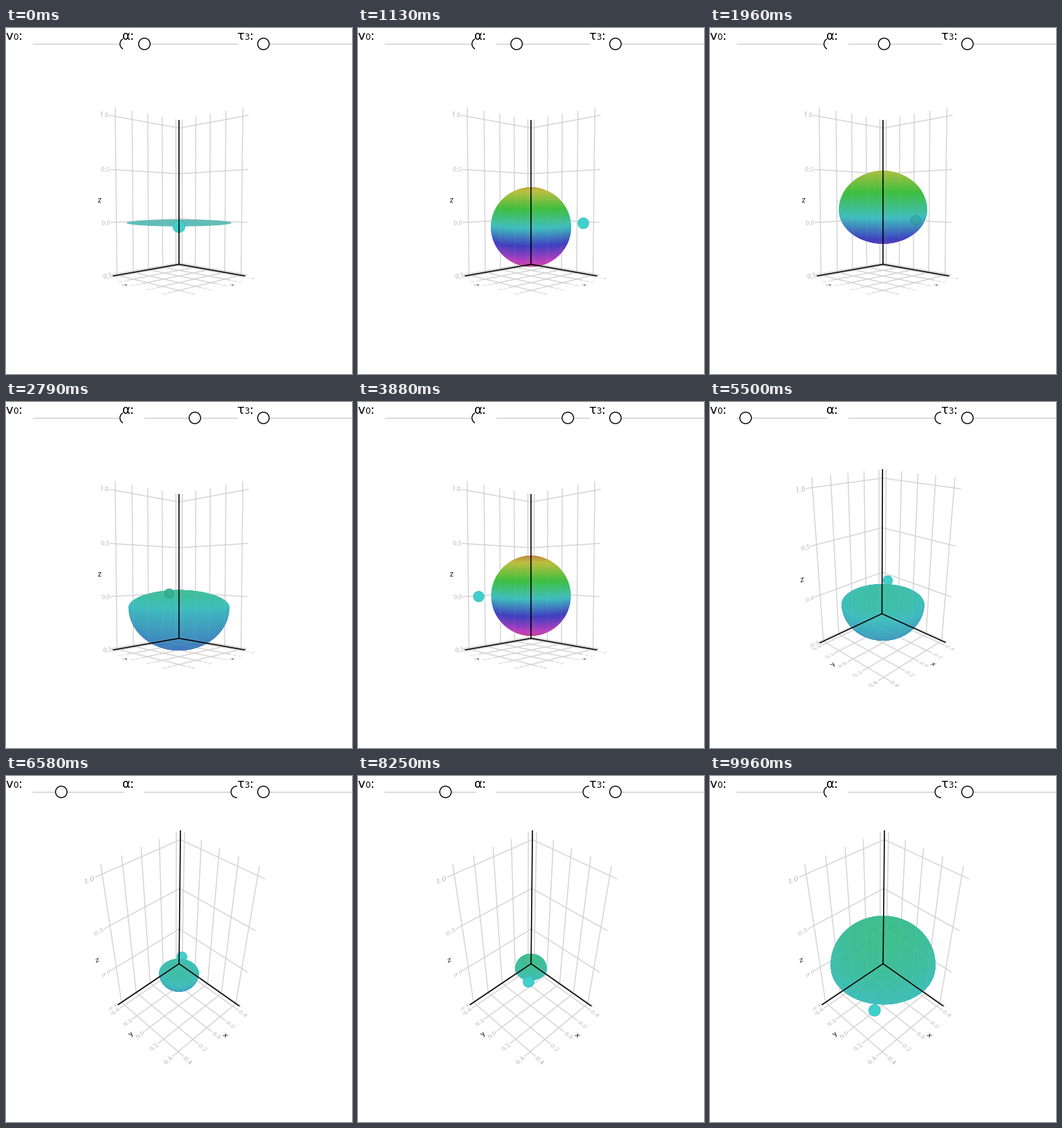
These frames come from a looping animation (500x500 px, 10 s). A matplotlib script:

```python
import numpy as np
import matplotlib.pyplot as plt
from matplotlib.animation import FuncAnimation
from matplotlib.collections import LineCollection, PolyCollection
from matplotlib.colors import hsv_to_rgb
from matplotlib.patches import Circle, PathPatch, Rectangle
from matplotlib.path import Path
from matplotlib.textpath import TextPath

SIZE, DPI = 500, 100
FRAMES, INTERVAL = 250, 40
PX = 72 / DPI
FPS, HALF = 24, 119          # stepping rate and steps per slider sweep

DIST, FOCAL, MID = 3.6, 547, (250, 281)
EDGE, FLOOR, TOP = 0.45, -0.515, 1.085
TICKS = (-0.4, -0.2, 0.0, 0.2, 0.4)
ORBIT, BALL = 0.495, 0.05
ALPHA_MAX = np.radians(352)
GRID = (0.83, 0.83, 0.83)
STROKE = 1.6                 # ring outline in pixels, closes gaps between rings

# camera path: time in ms, elevation, azimuth offset and roll in degrees
CAM_T = (3980, 4180, 4900, 5500, 6200)
CAM_EL = (3.75, 11, 25.5, 24.8, 44.5)
CAM_AZ = (0, 0.3, 1, 1, 0)
CAM_ROLL = (0, 0.1, 0.2, 0.3, 0.6)


class Camera:
    def __init__(self, ms):
        self.el, self.az, self.roll = (
            np.radians(np.interp(ms, CAM_T, key)) for key in (CAM_EL, CAM_AZ, CAM_ROLL))
        self.eye_z = DIST * np.sin(self.el)

    def project(self, pts):
        """World points (..., 3) to screen pixels and pixels per unit."""
        x, y, z = np.moveaxis(np.asarray(pts, float), -1, 0)
        lat, near = (x - y) / np.sqrt(2), (x + y) / np.sqrt(2)
        ca, sa = np.cos(self.az), np.sin(self.az)
        lat, near = lat * ca + near * sa, near * ca - lat * sa
        c, s = np.cos(self.el), np.sin(self.el)
        up = z * c - near * s
        scale = FOCAL / (DIST - near * c - z * s)
        sx = MID[0] + (lat + self.roll * up) * scale
        sy = MID[1] - (up - self.roll * lat) * scale
        return np.stack([sx, sy], -1), scale


def grid_lines():
    lines = []
    for t in TICKS:
        lines += [
            [(-EDGE, t, FLOOR), (-EDGE, t, TOP)],
            [(t, -EDGE, FLOOR), (t, -EDGE, TOP)],
            [(t, -EDGE, FLOOR), (t, 0.47, FLOOR)],
            [(-EDGE, t, FLOOR), (0.47, t, FLOOR)],
        ]
    for z in (-0.5, 0.0, 0.5, 1.0):
        lines += [
            [(-EDGE, -EDGE, z), (-EDGE, 0.468, z)],
            [(-EDGE, -EDGE, z), (0.468, -EDGE, z)],
        ]
    return np.array(lines)


def axis_lines():
    corner = (-EDGE, -EDGE, FLOOR)
    ends = [(-EDGE, -EDGE, TOP), (EDGE, -EDGE, FLOOR), (-EDGE, EDGE, FLOOR)]
    return np.array([[corner, end] for end in ends])


def flat_text(text, center, right, up, size, family):
    """Text outline lying in the plane spanned by right and up."""
    path = TextPath((0, 0), text, size=20, prop={"family": family})
    box = path.get_extents()
    mid = np.array([(box.x0 + box.x1) / 2, (box.y0 + box.y1) / 2])
    uv = (path.vertices - mid) * size / 20
    pts = np.array(center) + uv[:, :1] * np.array(right) + uv[:, 1:] * np.array(up)
    return pts, path.codes


def join(parts):
    return np.concatenate([p for p, _ in parts]), np.concatenate([c for _, c in parts])


WALL = dict(right=(0, -1, 0), up=(0, 0, 1))
LEFT = dict(right=(0, -1, 0), up=(-1, 0, 0))
RIGHT = dict(right=(1, 0, 0), up=(0, -1, 0))


def tick_labels():
    style = dict(size=0.057, family="DejaVu Serif")
    parts = [flat_text(f"{z:.1f}", (-EDGE, 0.52, z), **WALL, **style)
             for z in (-0.5, 0.0, 0.5, 1.0)]
    for t in TICKS:
        parts.append(flat_text(f"{t:.1f}", (t, 0.53, FLOOR), **LEFT, **style))
        parts.append(flat_text(f"{t:.1f}", (0.53, t, FLOOR), **RIGHT, **style))
    return join(parts)


def axis_names():
    style = dict(size=0.075, family="DejaVu Sans")
    return join([
        flat_text("z", (-EDGE, 0.585, 0.21), **WALL, **style),
        flat_text("y", (-0.06, 0.59, FLOOR), **LEFT, **style),
        flat_text("x", (0.59, -0.06, FLOOR), **RIGHT, **style),
    ])


def surface(alpha, v):
    """Rings (radius, height, colour) of the closed body of revolution."""
    theta = np.linspace(0.02, np.pi - 0.02, 120)
    psi = alpha % np.pi
    bend = np.sin(psi)
    swell = 0.5 * (1 + 0.06 * bend)
    top, low = swell * np.sin(psi / 2), swell * np.cos(psi / 2)
    waist = (top - low) / 2 * np.sqrt(bend)
    width = 0.5 - 0.122 * bend ** 1.1
    cos = np.cos(theta)
    z = waist + np.where(cos > 0, top - waist, low + waist) * cos
    level = (cos + z / 0.4) / 2 * np.sign(v)
    hue = 180 - 150 * bend * level
    hsv = np.stack([hue / 360, np.full_like(hue, 0.67), np.full_like(hue, 0.745)], -1)
    return abs(v) * width * np.sin(theta), v * z, hsv_to_rgb(np.clip(hsv, 0, 1))


TURN = np.linspace(0, 2 * np.pi, 60, endpoint=False)


def ring_points(r, z):
    r, z = np.atleast_1d(r)[:, None], np.atleast_1d(z)[:, None]
    flat = np.zeros_like(TURN)
    return np.stack([r * np.cos(TURN), r * np.sin(TURN), z + flat], -1)


fig = plt.figure(figsize=(SIZE / DPI, SIZE / DPI), dpi=DPI, facecolor="white")
ax = fig.add_axes([0, 0, 1, 1])
ax.set(xlim=(0, SIZE), ylim=(SIZE, 0))
ax.axis("off")


def add_lines(color, width, z, alpha=1):
    lines = LineCollection([], colors=[color], linewidths=width * PX, zorder=z, alpha=alpha)
    return ax.add_collection(lines)


def add_outline(color):
    return ax.add_patch(PathPatch(Path([(0, 0)]), fc=color, lw=0, zorder=2))


GRID_PTS, AXIS_PTS = grid_lines(), axis_lines()
TICK_PTS, TICK_CODES = tick_labels()
NAME_PTS, NAME_CODES = axis_names()

grid = add_lines(GRID, 1.4, 1)
grid_through = add_lines(GRID, 1.4, 5, 0.08)
axes3d = add_lines("black", 1.6, 8)
ticks = add_outline("0.68")
names = add_outline("0.1")
body = ax.add_collection(PolyCollection([], linewidths=STROKE * PX, zorder=4))
ball = ax.add_patch(Circle((0, 0), 8, fc="#40d0cc", ec="#35b9b6", lw=0.8 * PX))
ghost = ax.add_patch(Circle((0, 0), 8, fc="#1f9f8c", ec="#147d70", lw=PX, alpha=0.4, zorder=5))


def slider(x0, x1, label_x, letter, sub, clip):
    base = dict(va="baseline", family="DejaVu Sans", color="black")
    ax.text(label_x, 17, letter, size=18 * PX, **base)
    colon_x = label_x + 11.5
    if sub:
        ax.text(label_x + 10.7, 17, sub, size=12 * PX, **base)
        colon_x = label_x + 18.5
    ax.text(colon_x, 17, ":", size=18 * PX, **base)
    ax.plot([x0, x1], [23, 23], color="0.8", lw=1.4 * PX)
    knob = ax.add_patch(Circle((x0, 23), 8.3, fc="white", ec="black", lw=1.4 * PX, zorder=6))
    knob.set_clip_path(Rectangle((0, 0), clip, 50, transform=ax.transData))
    return knob


v_knob = slider(39, 169, -0.8, "v", "0", 168.5)
a_knob = slider(200, 334, 167.6, "α", "", 334)
slider(372, 500, 333.4, "τ", "3", 500)


def state(ms):
    """Progress of the alpha sweep, then of the v0 sweep."""
    step = int(ms * FPS / 1000 + 0.5)
    if step <= HALF + 1:
        return max(step - 1, 0) / HALF, 1.0
    return 1.0, (step - HALF - 2) / (HALF - 1)


def draw_body(cam, alpha, v):
    # without any turn the body collapses to a translucent disc
    if alpha == 0:
        body.set_verts(cam.project(ring_points(0.495, 0))[0])
        body.set_facecolor([(0.28, 0.70, 0.68, 0.86)])
        body.set_edgecolor("none")
        return
    r, z, rgb = surface(alpha, v)
    r = np.maximum(r - STROKE / 2 * DIST / FOCAL, 0)
    order = np.argsort(-abs(z - cam.eye_z))
    body.set_verts(cam.project(ring_points(r[order], z[order]))[0])
    body.set_facecolor(rgb[order])
    body.set_edgecolor(rgb[order])


def draw_ball(cam, alpha, v):
    side, near = v * ORBIT * np.sin(alpha), v * ORBIT * np.cos(alpha)
    pos = ((near + side) / np.sqrt(2), (near - side) / np.sqrt(2), 0)
    center, scale = cam.project(pos)
    for disc in (ball, ghost):
        disc.center = tuple(center)
        disc.radius = BALL * scale
    behind = near < 0
    ball.set_zorder(3 if behind else 7)
    # the ghost shows only where the surface hides the ball
    ghost.set_visible(bool(behind and cam.el < 0.1 and abs(side) < 0.4))


def draw(n):
    ms = n * INTERVAL
    cam = Camera(ms)
    s, w = state(ms)
    alpha, v = ALPHA_MAX * s, 2 * w - 1

    lines = cam.project(GRID_PTS)[0]
    grid.set_segments(lines)
    grid_through.set_segments(lines)
    axes3d.set_segments(cam.project(AXIS_PTS)[0])
    ticks.set_path(Path(cam.project(TICK_PTS)[0], TICK_CODES))
    names.set_path(Path(cam.project(NAME_PTS)[0], NAME_CODES))

    draw_body(cam, alpha, v)
    draw_ball(cam, alpha, v)
    a_knob.center = (200 + 133.5 * s, 23)
    v_knob.center = (39 + 134 * w, 23)
    return []


anim = FuncAnimation(fig, draw, frames=FRAMES, interval=INTERVAL,
                     init_func=lambda: draw(0), repeat=True, repeat_delay=0, blit=False)
plt.show()
```
